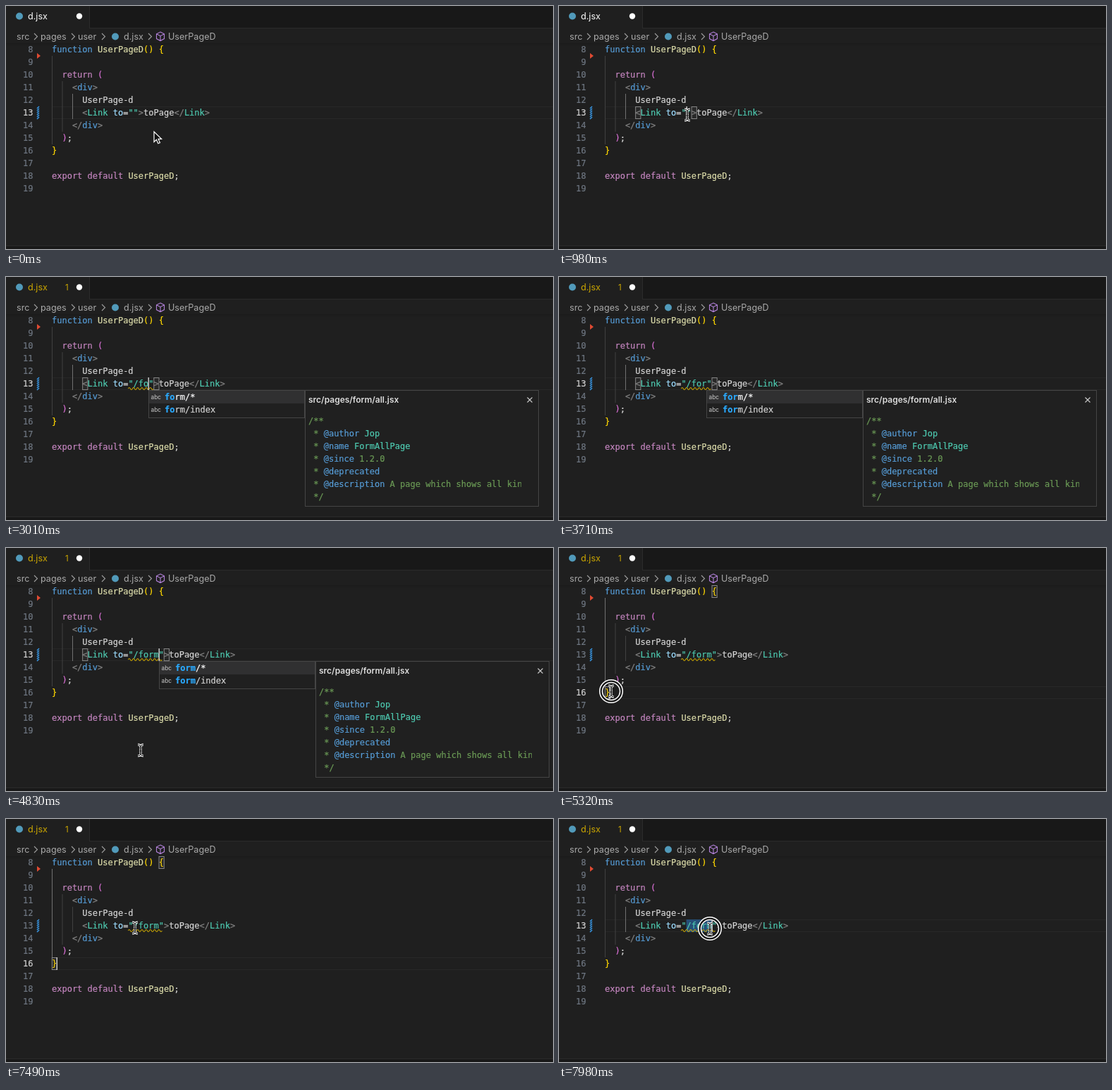
Recreate the animation shown at these times as an HTML page. Size 776 by 346 pixels, loop 8000 ms.

```html
<!DOCTYPE html>
<html lang="en">
<head>
<meta charset="utf-8">
<title>Editor path completion</title>
<style>
html, body { margin: 0; width: 100%; height: 100%; overflow: hidden; background: #1f1f1f; }
svg { display: block; width: 776px; height: 346px; }
text { white-space: pre; }
.m { font: 12px "DejaVu Sans Mono", monospace; }
.m tspan, .m { stroke-width: .2px; }
.u { font-family: Inter, "Open Sans", sans-serif; font-size: 12.6px; }
</style>
</head>
<body>
<svg viewBox="0 0 776 346"><g id="base"></g><g id="live"></g></svg>
<script>
const LOOP = 8000, CH = 7.2246, LEFT = 65;
const C = {
  key: '#569cd6', fn: '#dcdcaa', gold: '#ffd700', pink: '#c586c0', orchid: '#da70d6',
  tag: '#808080', type: '#4ec9b0', attr: '#9cdcfe', text: '#d4d4d4', green: '#6a9955', warn: '#cca700'
};
const FILES = ['403', 'account/:some', 'form/*', 'form/index', 'link/:index?', 'user', 'user/b', 'user/c', 'user/d', 'user/e'];
const TYPED = [[1820, '/'], [2870, '/f'], [3010, '/fo'], [3200, '/for'], [3800, '/form']];
const FOCUS = 780, WARN = 3000, CLICK = 5310, HOVER = 6140, UNHOVER = 7140, PRESS = 7590;

// time, x, y of the pointer; it rests between equal points
const PATH = [
  [0, 210, 179], [70, 210, 179], [210, 207, 157], [350, 207, 157], [630, 180, 154], [770, 180, 154],
  [980, 182, 155], [1190, 182, 155], [1470, 181, 153], [1820, 181, 153],
  [4830, 191, 288], [5310, 74, 204], [5500, 74, 204], [6020, 200, 155], [6990, 200, 155],
  [7350, 183, 155], [7600, 183, 155], [7960, 214, 156], [8000, 214, 156]
];

const esc = s => s.replace(/&/g, '&amp;').replace(/</g, '&lt;').replace(/>/g, '&gt;');
const col = n => LEFT + n * CH;
const top_ = line => 143 + (line - 13) * 18;
const rect = (x, y, w, h, fill, more = '') => `<rect x="${x}" y="${y}" width="${w}" height="${h}" fill="${fill}" ${more}/>`;
const path = (d, stroke, w = 1, fill = 'none') => `<path d="${d}" stroke="${stroke}" stroke-width="${w}" fill="${fill}"/>`;
const dot = (x, y, r, fill) => `<circle cx="${x}" cy="${y}" r="${r}" fill="${fill}"/>`;
const ui = (x, y, s, fill, more = '') => `<text class="u" x="${x}" y="${y}" fill="${fill}" ${more}>${esc(s)}</text>`;

// colour and text pairs in one monospaced run
function mono(x, y, ...pairs) {
  let out = '';
  for (let i = 0; i < pairs.length; i += 2)
    out += `<tspan fill="${pairs[i]}" stroke="${pairs[i]}">${esc(pairs[i + 1])}</tspan>`;
  return `<text class="m" x="${x}" y="${y}">${out}</text>`;
}
const code = (line, n, ...pairs) => mono(col(n), top_(line) + 13, ...pairs);
const panel = (x, y, w, h) => rect(x + .5, y + .5, w - 1, h - 1, '#202020', 'stroke="#454545"');

function drawBase() {
  let s = rect(0, 0, 776, 346, '#1f1f1f') + rect(118, 0, 658, 31, '#181818') +
    rect(118, 0, 1, 31, '#2b2b2b') + rect(118, 31, 658, 1, '#2b2b2b') +
    rect(0, 341, 776, 1, '#2b2b2b') + rect(0, 342, 776, 4, '#181818') +
    rect(0, 53, 776, 1, '#1b1b1b') + rect(0, 54, 776, 2, '#1d1d1d');
  s += dot(19, 14.5, 5, '#519aba') + dot(104, 14.5, 4.2, '#fff') + dot(155, 43.5, 5, '#519aba');
  [[15, 'src'], [49, 'pages'], [102, 'user'], [167, 'd.jsx'], [230, 'UserPageD']]
    .forEach(([x, w]) => s += ui(x, 48, w, '#a9a9a9'));
  [42, 95, 138, 204].forEach(x => s += path(`M${x - 2} 39l4.5 4.5l-4.5 4.5`, '#a0a0a0', 1.1));
  s += path('M219 37l5.5 2.8v6.8l-5.5 3l-5.5 -3v-6.8zM213.5 39.8l5.5 2.9l5.5 -2.9M219 42.7v6.9', '#b180d7', 1.1);
  s += path('M44 67l5 4l-5 4z', 'none', 0, '#e04a32');
  for (let y = 143; y < 161; y += 3) s += path(`M44 ${y + 3}l3 -3`, '#3794e0', 1.6);
  s += code(8, 0, C.key, 'function ', C.fn, 'UserPageD', C.gold, '() {') +
    code(10, 2, C.pink, 'return ', C.orchid, '(') +
    code(11, 4, C.tag, '<', C.key, 'div', C.tag, '>') +
    code(12, 6, C.text, 'UserPage-d') +
    code(14, 4, C.tag, '</', C.key, 'div', C.tag, '>') +
    code(15, 2, C.orchid, ')', C.text, ';') +
    code(16, 0, C.gold, '}') +
    code(18, 0, C.pink, 'export default ', C.fn, 'UserPageD', C.text, ';');
  return s;
}

function pointer(t) {
  const i = Math.max(1, PATH.findIndex(p => p[0] > t));
  const [t0, x0, y0] = PATH[i - 1], [t1, x1, y1] = PATH[i];
  const k = (t - t0) / (t1 - t0), e = k * k * (3 - 2 * k);
  return [x0 + (x1 - x0) * e, y0 + (y1 - y0) * e];
}

function drawPointer(t, x, y) {
  if (t >= 1820 && t < 4830) return '';
  const ring = t >= 770 && t < 980 || t >= 1610 && t < 1680 || t >= CLICK && t < 5530 || t >= PRESS;
  let s = '';
  if (ring) s += `<g fill="none"><circle cx="${x}" cy="${y}" r="14.3" stroke="#161616" stroke-width="5"/>` +
    `<circle cx="${x}" cy="${y}" r="16.3" stroke="#fff" stroke-width="1.5"/>` +
    `<circle cx="${x}" cy="${y}" r="12.5" stroke="#fff" stroke-width="1.5"/></g>`;
  if (t < 140) return s + path(`M${x} ${y}v14.5l3.4 -3.2l2.4 5.4l2.6 -1.1l-2.4 -5.3h4.6z`, '#fff', 1.2, '#111');
  const beam = `M${x - 4} ${y - 8}q4 0 4 3v10q0 3 -4 3M${x + 4} ${y - 8}q-4 0 -4 3v10q0 3 4 3M${x - 2} ${y + 1}h4`;
  return s + path(beam, '#fff', 3) + path(beam, '#111', 1);
}

function drawDocs(x, all) {
  const tx = x + 5, y = n => 209 + n * 18;
  let s = panel(x, 161, 332, all ? 166 : 148) +
    ui(tx, 179, `src/pages/${all ? 'form/all' : '403'}.jsx`, '#ddd', 'style="font-size:12px;font-weight:600"') +
    path(`M${x + 315.5} 171.5l7 7m0 -7l-7 7`, '#ccc', 1.1);
  let rows;
  if (all) {
    rows = [['', '', '/**'], ['@author ', 'Jop', ''], ['@name ', 'FormAllPage', ''], ['@since ', '', '1.2.0'],
      ['@deprecated', '', ''], ['@description ', '', 'A page which shows all kinds'], ['', '', ' */']]
      .map(([tag, name, rest]) => [C.green, tag ? ' * ' : '', C.key, tag, C.type, name, C.green, rest]);
  } else {
    const eq = '='.repeat(12);
    rows = ['/*' + eq.slice(1) + 'ombertrek-config-start' + eq, '// eslint-disable-next-line no-unused-vars',
      'const routeOptions = {', '  layout: false,', '};', eq + 'ombertrek-config-end' + eq].map(r => [C.green, r]);
  }
  rows.forEach((r, i) => s += mono(tx, y(i), ...r));
  return `<clipPath id="doc"><path d="M${x} 161h307v170h-307zM${x + 307} 161h25v31h-25zM${x + 307} 192h25v140h-25z"/></clipPath>` +
    s.replace(/<text class="m"/g, '<text clip-path="url(#cut)" class="m"') +
    `<clipPath id="cut"><path d="M${x} 161h307v170h-307z"/></clipPath>`;
}

function drawList(t, typed) {
  const x = Math.round(col(16 + typed.length)), part = typed.slice(1);
  const names = FILES.filter(f => f.startsWith(part));
  let s = panel(x, 161, 222, names.length * 18 + (part ? 4 : 3)) + rect(x + 1, 162, 220, 18, '#303031');
  if (!part) s += rect(x + 1, 180, 220, 18, '#2a2b2d');
  names.forEach((f, i) => {
    const y = 175 + i * 18, ink = i ? C.text : '#fff';
    s += ui(x + 3.5, y - 1, 'abc', '#ccc', 'style="font-size:8.3px"');
    s += mono(x + 23, y, '#2aaaff', part, ink, f.slice(part.length))
      .replace('<tspan', '<tspan font-weight="bold"');
  });
  return s + (t >= 1850 ? drawDocs(x + 222, !!part) : '');
}

function drawHover(a) {
  return `<g opacity="${a.toFixed(2)}">` + panel(173, 92, 294, 52) + rect(174, 118, 292, 25, '#252526') +
    rect(174, 118, 292, 1, '#454545') +
    mono(182, 110, '#ccc', 'The path [/form] has no matched route.') +
    ui(182, 135, 'View Problem (⌥F8)', '#3794ff', 'style="font-size:11.6px"') +
    ui(314, 135, 'No quick fixes available', '#ccc', 'style="font-size:11.6px"') + '</g>';
}

function drawLive(t) {
  const step = TYPED.filter(p => p[0] <= t).pop();
  const typed = step ? step[1] : '', end = 16 + typed.length;
  const warn = t >= WARN, atEnd = t >= CLICK && t < PRESS, line = atEnd ? 16 : 13;
  const [x, y] = pointer(t);
  let s = warn ? ui(31, 19, 'd.jsx', C.warn) + ui(84, 19, '1', C.warn, 'style="font-size:11.5px"') : ui(31, 19, 'd.jsx', '#fff');

  s += rect(LEFT, top_(line), 711, 1, '#282828') + rect(LEFT, top_(line) + 17, 711, 1, '#282828');
  for (let n = 8; n <= 19; n++)
    s += mono(38.5, top_(n) + 13, n === line ? '#d0d0d0' : '#6e7681', '' + n).replace('<text', '<text text-anchor="end"');
  s += rect(65, 71, 1, 126, atEnd ? '#707070' : '#404040') + rect(79.5, 107, 1, 72, '#404040') +
    rect(94, 125, 1, 36, atEnd ? '#404040' : '#707070');

  const hover = t >= HOVER && t < UNHOVER;
  if (hover) s += rect(col(15), 143, 7 * CH, 18, '#264f78', 'opacity=".45"');
  if (t >= PRESS) {
    const n = Math.min(21, Math.round((x - LEFT) / CH));
    s += rect(col(16), 143, Math.max(0, n - 16) * CH, 18, '#264f78');
  }
  s += code(13, 6, C.tag, '<', C.type, 'Link ', C.attr, 'to', C.text, '=', C.type, `"${typed}"`,
    C.tag, '>', C.text, 'toPage', C.tag, '</', C.type, 'Link', C.tag, '>');
  if (warn) {
    let d = `M${col(15)} 159`;
    for (let w = 0; w < (typed.length + 2) * CH - 3; w += 6) d += 'q1.5 -3 3 0t3 0';
    s += path(d, C.warn, 1.1);
  }

  const box = (n, ln) => rect(col(n) + .3, top_(ln) + .5, CH, 17, '#80808018', 'stroke="#888"');
  if (atEnd) s += box(0, 16) + box(21, 8);
  else if (t >= FOCUS && t < PRESS) s += box(6, 13) + box(end + 1, 13);

  const since = t >= PRESS ? PRESS : atEnd ? CLICK : step ? step[0] : FOCUS;
  if (t >= since && Math.floor((t - since) / 500) % 2 === 0) {
    const n = t >= PRESS ? Math.min(21, Math.round((x - LEFT) / CH)) : atEnd ? 1 : end;
    s += rect(Math.round(col(n)) - .5, top_(line), 1.5, 18, '#c8c8c8');
  }
  if (typed && t < CLICK) s += drawList(t, typed);
  if (hover) s += drawHover(Math.min(1, .12 + Math.max(0, t - 6160) / 160));
  return s + drawPointer(t, x, y);
}

const live = document.getElementById('live');
document.getElementById('base').innerHTML = drawBase();
let start, last;
function frame(now) {
  start ??= now;
  const s = drawLive((now - start) % LOOP);
  if (s !== last) live.innerHTML = last = s;
  requestAnimationFrame(frame);
}
live.innerHTML = drawLive(0);
requestAnimationFrame(frame);
</script>
</body>
</html>
```
